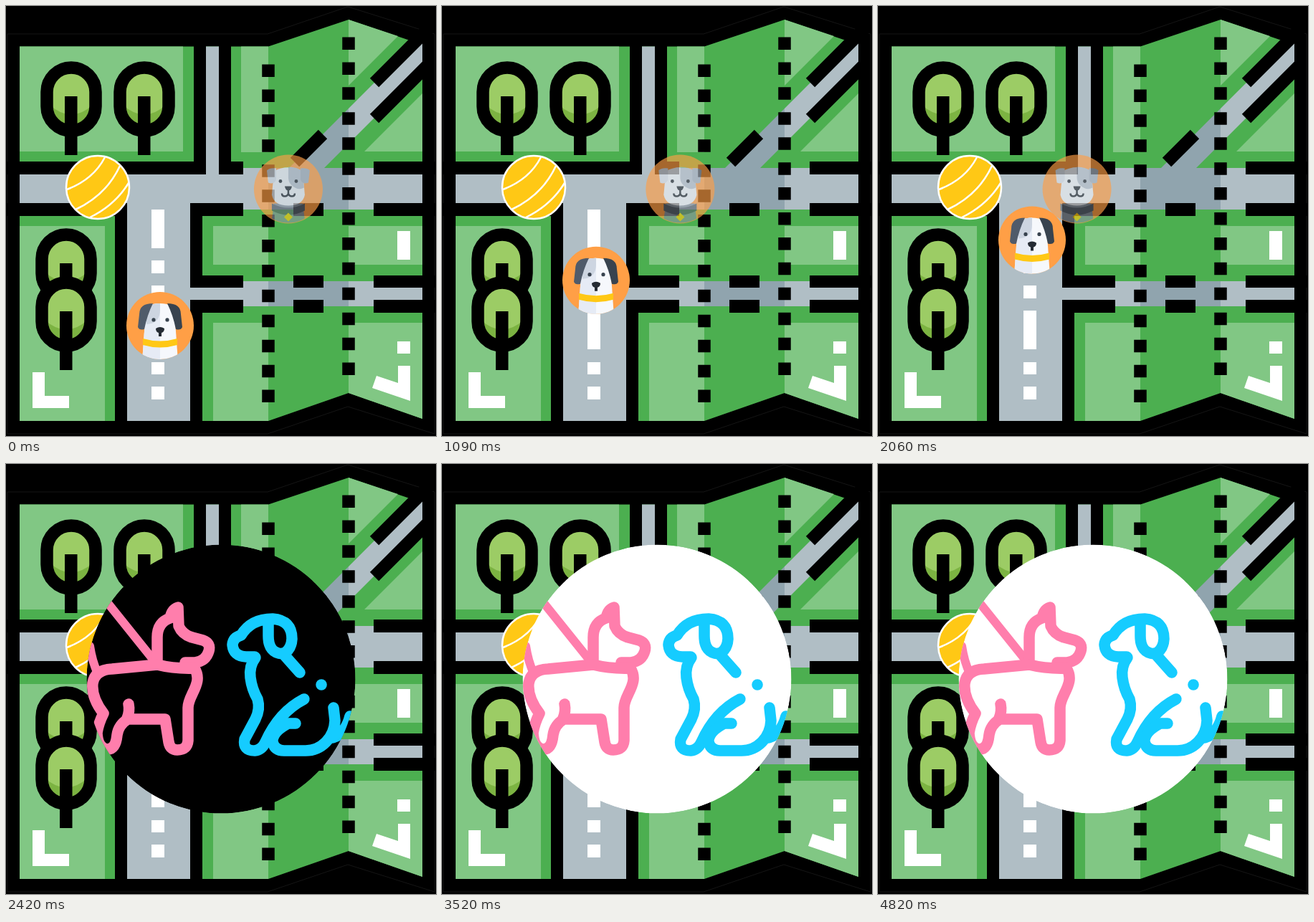
An HTML page for the animation above (4.85 s loop, 600x600 px).

```html
<!DOCTYPE html>
<html>
<head>
<meta charset="utf-8">
<style>
  html, body { margin: 0; height: 100%; overflow: hidden; background: #000; }
  svg { display: block; width: 100vw; height: 100vh; }
  .line { fill: none; stroke-width: 15.5; stroke-linecap: round; stroke-linejoin: round; }
  .thin { stroke-width: 12; }
</style>
</head>
<body>
<svg viewBox="0 0 600 600">
  <defs>
    <clipPath id="badge"><circle r="47"/></clipPath>
    <clipPath id="disc"><circle cx="300" cy="300" r="187.5"/></clipPath>
    <g id="tree">
      <rect x="57" y="86" width="68" height="88" rx="34" fill="#7cb342"/>
      <path d="M62 139V112a29 29 0 0 1 58 0v27q-29 25-58 0z" fill="#9ccc65"/>
      <rect x="57" y="86" width="68" height="88" rx="34" fill="none" stroke="#000" stroke-width="17.5"/>
      <path d="M82 126h17.5v82H82z"/>
    </g>
  </defs>

  <!-- folded map -->
  <path d="M2 597V39H365L477 1 598 39V597L477 559 365 597z" fill="none" stroke="#151515"/>
  <path d="M19 56.5H366L478 19 581 54V576L478 540 366 579H19z" fill="#4caf50"/>
  <path fill="#81c784" d="M19 56.5H247V203H19zM328 56.5h38V204h-38zM19 307H138V579H19zM289 307h77v54h-77z
    M289 442h77V579h-77zM478 19l69 23-69 69zM500 203l81-81v81zM478 307H581v54H478zM478 442H581V576L478 540z"/>
  <path fill="#b0bec5" d="M279 56.5h18V240h-18zM19 235H331v-9h35v58h-35v-9H257V579H169V275H19z
    M257 393h74v-9h35v35h-35v-9h-74zM478 226H581v58H478zM478 384H581v35H478zM478 143L581 40V89L478 192z"/>
  <path fill="#90a4ae" d="M366 226h29L478 143v141H366zM366 384H478v35H366z"/>
  <path fill="#4caf50" d="M444 226l34-34v34z"/>
  <path d="M262 40h17V235H0V217H262zM297 40h17V217h17v18H297zM0 275H169V579H152V293H0z
    M257 275h74v18H274v83h57v17H257zM257 410h74v18H274V579H257zM401 275h42v18h-42zM401 376h42v17h-42z
    M401 410h42v18h-42zM513 217h87v18H513zM513 275h87v18H513zM513 376h87v17H513zM513 410h87v18H513z"/>
  <path d="M403 218l39-39M514 107l76-76M514 157l76-76" stroke="#000" stroke-width="17.5"/>
  <path d="M366 81.5V560M478 43.5V520" stroke="#000" stroke-width="17.5" stroke-dasharray="17.5 17.43"/>
  <path fill="#fff" d="M203 284h18v54h-18zM203 355h18v18h-18zM203 390h18v18h-18zM203 425h18v54h-18z
    M203 497h18v17h-18zM203 531h18v18h-18zM37 511h17v33h34v17H37zM546 314h18v40h-18zM546 468h18v17h-18z
    M547 502h17v49L511 533l6-17 30 10z"/>
  <use href="#tree"/>
  <use href="#tree" x="102"/>
  <use href="#tree" x="-7" y="233"/>
  <use href="#tree" x="-7" y="300"/>

  <!-- ball -->
  <g fill="none" stroke="#fff" stroke-width="2.5">
    <circle cx="128" cy="253" r="44" fill="#ffc815"/>
    <path d="M85 256Q122 242 138 211M97 284Q140 264 159 223M117 295Q152 278 171 247"/>
  </g>

  <g id="white-dog">
    <circle r="47" fill="#ff9f46"/>
    <g clip-path="url(#badge)">
      <path d="M-25 50L-20-20Q-18-31 0-31T20-20L25 50z" fill="#f6f8fc"/>
      <path d="M0-31Q-18-31-20-20L-25 50H0z" fill="#e6ebf5"/>
      <path d="M0-31Q-16-31-19-23V-2Q0-3 0-22z" fill="#cdd5e1"/>
      <path d="M-10-31Q-29-31-29-16L-31 2Q-29 7-22 5-18-15-10-31z" fill="#505b6a"/>
      <path d="M10-31Q29-31 29-16L31 2Q29 7 22 5 18-15 10-31z" fill="#38434f"/>
      <path d="M-24 18Q0 25 24 18V27Q0 34-24 27z" fill="#ffc815"/>
      <path d="M-6 4Q0 0 6 4 6 9 2 10V15H-2V10Q-6 9-6 4z" fill="#252b33"/>
      <g fill="#38434f"><circle cx="-9" cy="-8" r="2.6"/><circle cx="10" cy="-8" r="2.6"/></g>
    </g>
  </g>

  <g id="gray-dog" opacity=".65">
    <circle r="48" fill="#ff9f46"/>
    <g clip-path="url(#badge)">
      <path d="M-24 50L-20 20H20L24 50z" fill="#8b949f"/>
      <path d="M-20-25Q0-36 20-25L23 8Q20 23 0 23T-23 8z" fill="#eef1f6"/>
      <path d="M0-31Q12-31 20-25L22-2Q13 3 4-6 0-10 0-16z" fill="#b9c2ce"/>
      <path d="M-17-29Q-26-30-30-26L-28-9Q-20-6-17-13z" fill="#dbe1e9"/>
      <path d="M17-29Q26-30 30-26L28-9Q20-6 17-13z" fill="#a8b2bf"/>
      <path d="M-23 20Q0 32 23 20V30Q0 42-23 30z" fill="#5d6670"/>
      <path d="M0 33l6 6-6 6-6-6z" fill="#ffc815"/>
      <path d="M-5-4H5Q4 2 0 2T-5-4z" fill="#252b33"/>
      <path d="M0 0V6Q-1 10-5 10T-9 6M0 6Q1 10 5 10T9 6" fill="none" stroke="#252b33" stroke-width="2.5"/>
      <g fill="#252b33"><circle cx="-11" cy="-11" r="2.4"/><circle cx="11" cy="-11" r="2.4"/></g>
    </g>
  </g>

  <g id="meeting" clip-path="url(#disc)">
    <circle id="plate" cx="300" cy="300" r="187.5"/>
    <g class="line" stroke="#ff7eac">
      <path class="thin" d="M138 189L207 275M117 254Q120 274 127 290"/>
      <path d="M211 279V242Q211 221 229 215 231 203 240 200L241 226Q246 238 260 242L275 246Q286 250 283 261 279 275 264 277H250"/>
      <path d="M211 280Q235 286 263 285C276 306 254 322 254 340V386Q253 399 239 399 229 399 227 388L222 356H170Q157 364 155 378 153 399 141 398 128 396 127 375 129 362 136 348 119 326 121 306 124 287 148 286L211 280"/>
      <path d="M171 335Q173 345 169 355"/>
    </g>
    <g class="line" stroke="#15ccff">
      <path d="M347 269H335Q317 268 316 252 317 242 328 239 342 216 372 216 399 218 399 244 398 260 386 265 366 264 366 240V222M386 264L410 291"/>
      <path d="M348 270Q339 282 341 298 343 314 351 328 355 342 348 356L333 384Q330 400 347 400 357 399 362 388 381 346 416 328"/>
      <path d="M404 362H394Q371 374 372 388 375 400 388 400H418C440 400 458 382 459 358L457 340M456 382Q474 376 480 352"/>
      <path d="M440 308h.1"/>
    </g>
  </g>
</svg>
<script>
  const LOOP = 4850, MEET = 2100, BLINK = 770;
  const get = id => document.getElementById(id);
  const place = (id, x, y) => get(id).setAttribute('transform', `translate(${x} ${y})`);

  function draw() {
    const t = performance.now() % LOOP;
    const walk = Math.min(t, MEET);
    place('white-dog', 215, 446 - walk * .058);
    place('gray-dog', 394 - walk * .0565, 255.5);
    get('meeting').style.display = t < MEET ? 'none' : '';
    get('plate').setAttribute('fill', Math.floor((t - MEET) / BLINK) % 2 ? '#fff' : '#000');
    requestAnimationFrame(draw);
  }
  draw();
</script>
</body>
</html>
```
